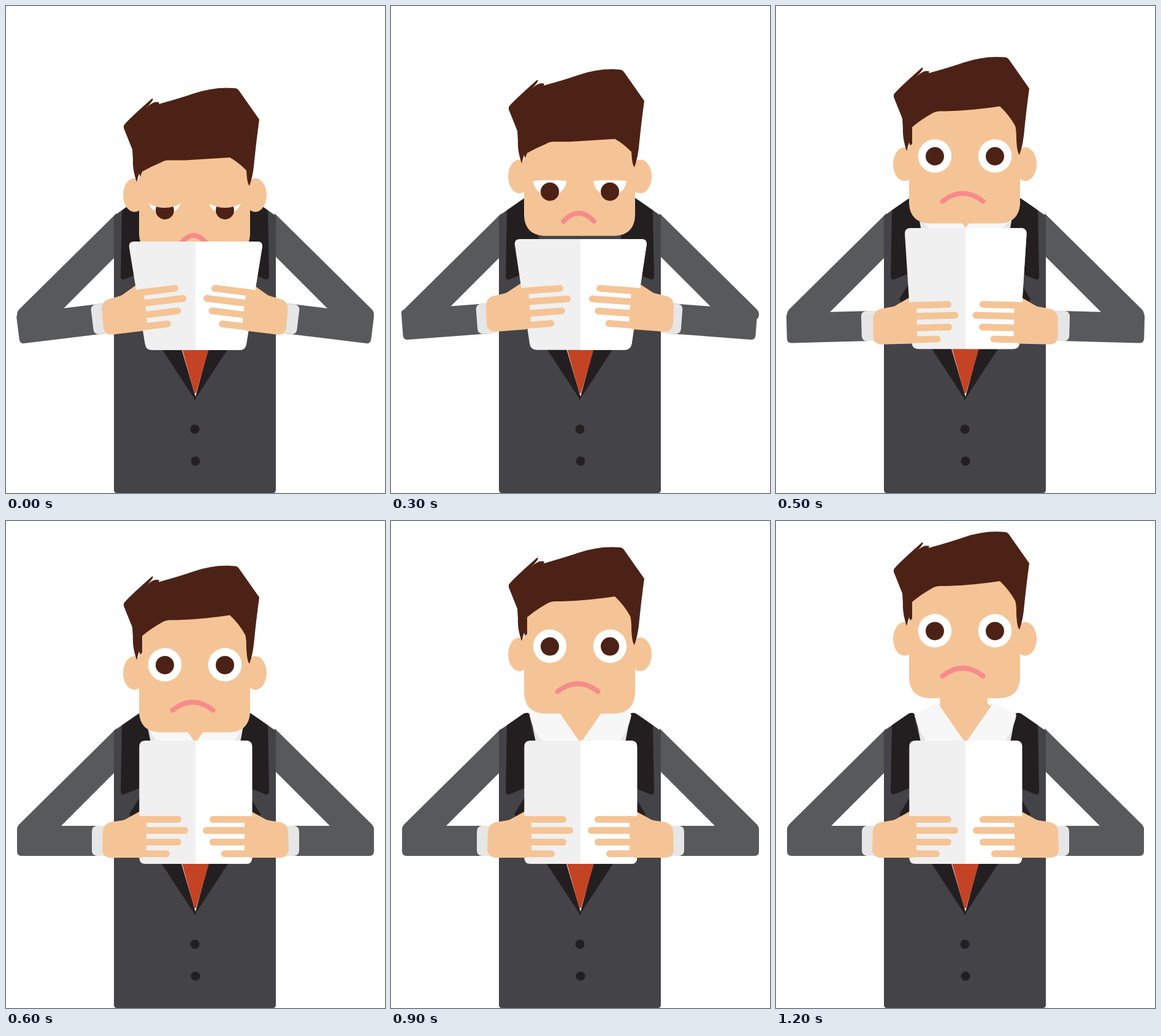
An HTML page for the animation above (1300 ms loop, 618 by 794 pixels).

```html
<!DOCTYPE html>
<html lang="en">
<head>
<meta charset="utf-8">
<title>Man reading</title>
<style>
  html, body { margin: 0; width: 100%; height: 100%; overflow: hidden; background: #fff; }
  svg { display: block; width: 618px; height: 794px; }
  .skin { fill: #f5c496; }
  .sleeve { fill: #58595b; }
  .suit { fill: #444347; }
  .black { fill: #231f20; }
  .hair { fill: #4d2216; }
  .cuff { fill: #e6e6e6; }
  .finger { fill: none; stroke: #f5c496; stroke-width: 11; stroke-linecap: round; }
</style>
</head>
<body>
<svg viewBox="0 0 618 794">
  <defs>
    <path id="upper" class="sleeve" d="M180 338L22 494Q18 498 18 503Q18 510 24 512H75L180 407Z"/>
    <g id="forearm">
      <path class="sleeve" d="M24 497H162V546H25Q18 546 18 538V503Q18 497 24 497Z"/>
      <path class="cuff" d="M148 497H172V546H148Q140 545 140 537V506Q140 498 148 497Z"/>
    </g>
    <path id="thumb" class="skin" d="M190 489L217 474L236 464L240 500H190Z"/>
    <g id="hand">
      <path class="skin" d="M157 536L158 505Q160 493 171 491L190 488L218 481L229 487V540Q228 547 220 549H170Q158 548 157 536Z"/>
      <path class="finger" d="M222 486.5H280.5M222 504.5H291.5M222 523.5H280.5M222 542.5H261.5"/>
    </g>
    <g id="lapel">
      <path class="suit" d="M176 342L218 313L240 330V780H176Z"/>
      <path class="black" d="M189 333L215 315Q224 310 226 316Q229 345 238 362L250 424L217 436L192 446Q187 446 187 441Z"/>
      <path class="black" d="M201 478L217 452L309 430V643Z"/>
    </g>
    <g id="collar">
      <path class="cuff" d="M228 318L268 297V372H238Z"/>
      <path d="M262 296L268 303L309 362V372H256Q231 345 226 316Z" fill="#f7f7f7"/>
    </g>
    <clipPath id="lid"><path id="lidShape"/></clipPath>
    <clipPath id="rightPage"><path d="M309 300H500V600H309Z"/></clipPath>
    <g id="eye" clip-path="url(#lid)">
      <circle id="white" cx="259" r="27.3" fill="#fff"/>
      <circle id="pupil" class="hair" cx="259" r="15"/>
    </g>
  </defs>

  <use href="#upper"/>
  <use href="#upper" transform="translate(618) scale(-1 1)"/>
  <path class="suit" d="M176 342L220 330H398L440 342V789Q440 794 435 794H181Q176 794 176 789Z"/>
  <use href="#lapel"/>
  <use href="#lapel" transform="translate(616) scale(-1 1)"/>
  <path d="M285 555H331L309 637Z" fill="#fff"/>
  <path d="M286 555H332L310 631H307Z" fill="#c44324"/>
  <circle class="black" cx="308" cy="690" r="7.5"/>
  <circle class="black" cx="309" cy="742" r="7.5"/>
  <path class="skin" d="M268 280H345V297L352 303L309 366L267 303Z"/>
  <use href="#collar"/>
  <use href="#collar" transform="translate(618) scale(-1 1)"/>

  <g id="head">
    <ellipse class="skin" cx="209.5" cy="192.3" rx="18.5" ry="27.5"/>
    <ellipse class="skin" cx="406.5" cy="192.3" rx="18.5" ry="27.5"/>
    <path class="skin" d="M217 90H398V257Q396 287 366 289H249Q219 287 217 257Z"/>
    <path id="hair" class="hair"/>
    <use href="#eye"/>
    <use href="#eye" x="98"/>
    <path id="mouth" fill="none" stroke="#f78b8b" stroke-width="8" stroke-linecap="round"/>
  </g>

  <use class="forearm" href="#forearm"/>
  <use class="forearm right" href="#forearm"/>
  <use class="hand" href="#thumb"/>
  <use class="hand right" href="#thumb"/>
  <path class="page" fill="#f0f0f0"/>
  <path class="page" fill="#fff" clip-path="url(#rightPage)"/>
  <use class="hand" href="#hand"/>
  <use class="hand right" href="#hand"/>
</svg>
<script>
const STEP = 100, COUNT = 13;
const $ = id => document.getElementById(id);
const all = name => document.querySelectorAll(name);
const clamp = v => Math.min(1, Math.max(0, v));

function roundPoly(points, r) {
  const n = points.length;
  const toward = ([x, y], [u, v]) => {
    const k = r / Math.hypot(u - x, v - y);
    return [x + (u - x) * k, y + (v - y) * k];
  };
  return points.map((p, i) => {
    const from = toward(p, points[(i + n - 1) % n]), to = toward(p, points[(i + 1) % n]);
    return `${i ? "L" : "M"}${from}Q${p} ${to}`;
  }).join("") + "Z";
}

const hairTop = "M192 79Q196 72 238 35Q244 34 229 50Q240 38 250 41L249 44Q285 34 305 27Q340 15 373 18" +
  "Q377 18 380 22L413 69Q408 105 404 146Q402 163 397 177Q393 174 392 152";
const hairEnd = "L217 157L213 171Q206 150 207 135L206 118L192 83Z";
const fringeUp = "Q392 136 390 130Q380 112 365 98Q310 106 268 106Q260 106 254 110Q236 120 222 132V159L219 162";
const fringeDown = "Q378 138 365 131L292 135.5H265Q259 135 253 139Q236 146 222 154L219 162";

function drawHead(step, down) {
  // Rises steadily, a little slower at the end.
  const y = 116 - 10.1 * Math.min(step, 9) - 8.4 * Math.max(step - 9, 0);
  $("head").setAttribute("transform", `translate(0 ${y})`);
  $("hair").setAttribute("d", hairTop + (down ? fringeDown : fringeUp) + hairEnd);
  $("white").setAttribute("cy", down ? 197 : 179);
  $("pupil").setAttribute("cy", down ? 217 : 179.5);

  const edge = down ? 205 - 1.8 * step : 140;
  const mid = down ? 213 - 5 * step : 140;
  $("lidShape").setAttribute("d", `M231 ${edge}Q259 ${2 * mid - edge} 287 ${edge}V260H231Z`);

  const w = down ? 20 + 0.55 * step * step : 33;
  const corner = down ? 270 - 1.6 * step : 253;
  const peak = down ? 258 - 2 * step : 240;
  const cx = down ? 306 : 304.5;
  $("mouth").setAttribute("d", `M${cx - w} ${corner}Q${cx} ${2 * peak - corner} ${cx + w} ${corner}`);
}

function drawPage(step) {
  const u = clamp((step - 2) / 4), sq = u * u, smooth = sq * (3 - 2 * u);
  const c = 309.3, top = 110 - 18 * sq, bottom = 81 + 11 * sq;
  const y0 = 384 - 26 * smooth, y1 = 561 - 2 * smooth;
  const d = roundPoly([[c - top, y0], [c + top, y0], [c + bottom, y1], [c - bottom, y1]], 10);
  all(".page").forEach(p => p.setAttribute("d", d));
}

// Turns a part about its pivot, moved to (x, y); the right side is mirrored.
function turn(name, [px, py], [x, y], angle, shift) {
  all(name).forEach(part => {
    const flip = part.classList.contains("right") ? `translate(${618 + shift}) scale(-1 1) ` : "";
    part.setAttribute("transform", `${flip}translate(${x} ${y}) rotate(${angle}) translate(${-px} ${-py})`);
  });
}

function drawArms(step, down) {
  const angle = down ? 0.9 * step - 7 : -1.5 * Math.max(0, 6 - step);
  const wrist = [157, 546], finger = [280.5, 486.5];
  turn(".forearm", wrist, down ? [160.5 - 0.6 * step, 534] : wrist, angle, down ? -1 - step : 0);
  turn(".hand", finger, down ? [275.5, 460.3] : finger, angle, down ? -2 : 0);
}

function draw(step) {
  const down = step < 5;
  drawHead(step, down);
  drawPage(step);
  drawArms(step, down);
}

const start = performance.now();
function tick() {
  draw(Math.floor((performance.now() - start) / STEP) % COUNT);
  requestAnimationFrame(tick);
}
tick();
</script>
</body>
</html>
```
